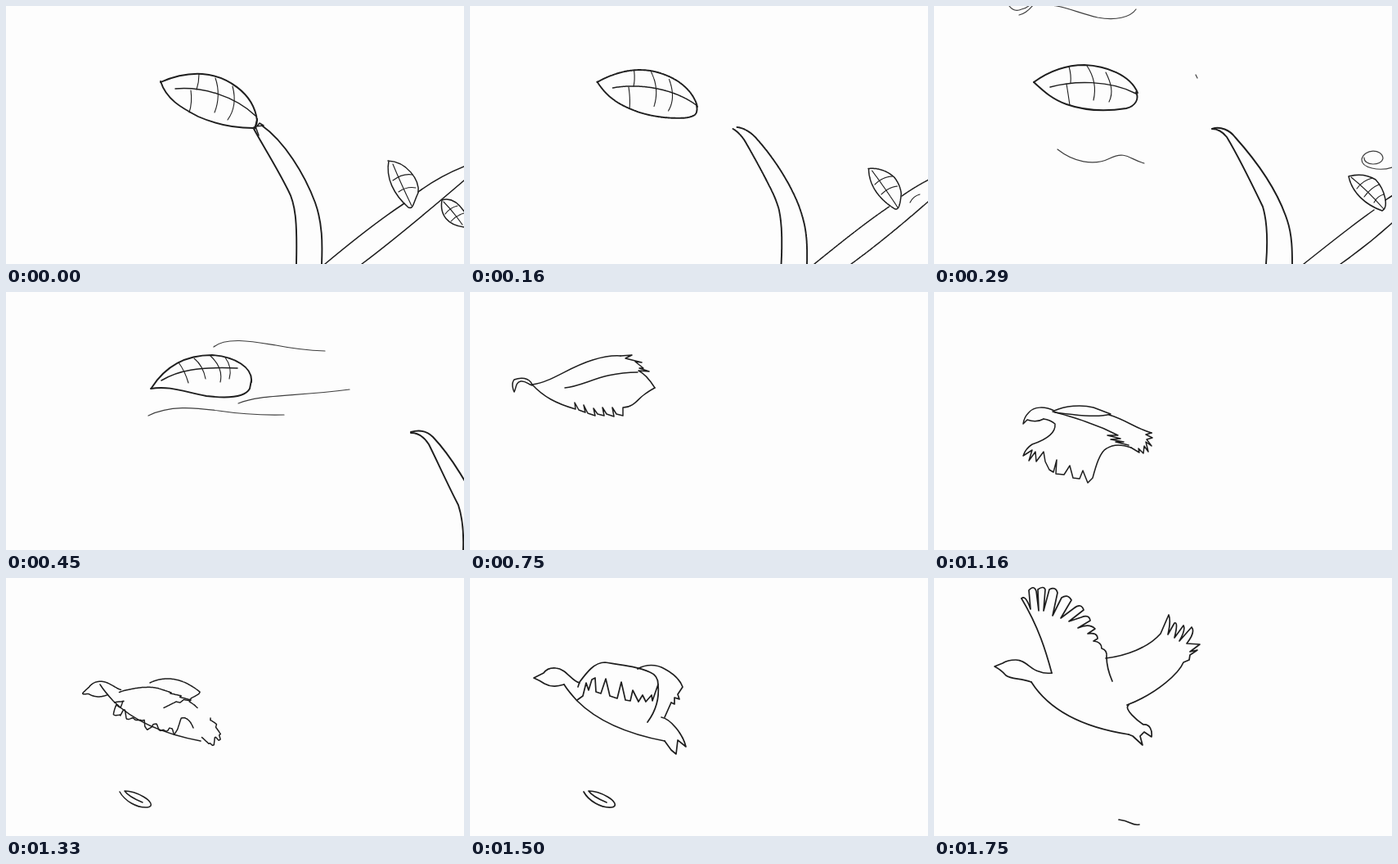
These frames come from a looping animation (560 by 315 pixels, 1.83 s). An HTML page:

```html
<!DOCTYPE html>
<html lang="en">
<head>
<meta charset="utf-8">
<title>Leaf to bird</title>
<style>
html, body { margin: 0; width: 100%; height: 100%; overflow: hidden; background: #fdfdfd; }
svg { display: block; width: 100vw; height: 100vh; }
path { fill: none; stroke: #1e1e1e; stroke-linecap: round; stroke-linejoin: round; }
</style>
</head>
<body>
<svg viewBox="0 0 560 315">
  <g id="branch"></g>
  <g id="flyer"></g>
  <g id="wind"></g>
</svg>
<script>
const LOOP = 1830, TICK = LOOP / 44, SAMPLES = 160;

const smooth = u => u * u * (3 - 2 * u);
const linear = u => u;

// Each pose holds until `hold`, then eases into the next, with an optional sideways bump.
const flyer = [
  { at: 0, hold: 1, ease: smooth, strokes: {
    top: 'M189 93C205 86 224 82 240 83C268 85 303 105 307 140',
    low: 'M189 92C196 114 214 124 235 135C258 145 280 149 302 149C306 148 307 144 307 138',
    rim: 'M207 101C240 98 280 110 305 134',
    rib1: 'M236 83Q236 93 233 102',
    rib2: 'M226 103Q228 118 224 130',
    rib3: 'M256 88C261 102 260 118 255 130',
    rib4: 'M277 98C281 113 279 128 271 139'
  } },
  { at: 7, ease: smooth, strokes: {
    top: 'M122 93C140 80 160 72 184 72C210 73 240 84 249 106',
    low: 'M122 93C135 105 145 114 162 120C185 128 210 129 235 125C247 122 251 113 247 105',
    rim: 'M142 99C170 91 215 90 247 107',
    rib1: 'M165 74Q168 84 167 94',
    rib2: 'M162 95Q164 107 166 121',
    rib3: 'M187 73C195 85 199 98 195 115',
    rib4: 'M210 81C216 93 220 105 214 117'
  } },
  { at: 11, ease: u => u ** 3, bump: 18, strokes: {
    top: 'M178 117C192 95 215 77 252 77C280 79 302 92 300 110',
    low: 'M177 118C200 114 218 122 245 127C270 130 292 129 298 118L300 108',
    rim: 'M190 108C210 96 235 91 283 93',
    rib1: 'M211 86Q219 97 223 111',
    rib2: 'M230 81Q241 90 244 106',
    rib3: 'M250 78Q266 93 262 110',
    rib4: 'M268 80Q277 92 273 106'
  } },
  { at: 18, ease: linear, bump: -50, strokes: {
    head: 'M76 113C72 104 62 104 54 107C50 112 53 120 54 122C57 117 55 111 62 109C68 108 70 112 76 114',
    top: 'M76 113C100 110 120 92 150 83Q170 77 184 78',
    low: 'M76 113C90 128 105 136 129 143L128 135L133 144L141 147L139 138L144 148L153 151L151 142L156 149L164 151L162 141L167 149L176 152L174 141L179 149L187 151L187 141C200 141 206 130 212 126Q220 120 226 117',
    rim: 'M116 117C140 115 160 98 205 98',
    tail: 'M184 78L198 77L190 81L210 86L202 85L212 93L207 93L219 97L206 96Q216 101 226 117'
  } },
  { at: 28, ease: linear, strokes: {
    head: 'M147 145C135 139 122 140 116 147Q110 153 109 161L114 156Q125 160 134 155',
    top: 'M147 145C160 139 180 137 195 141L216 149C200 154 170 150 148 147',
    back: 'M214 150C235 156 245 166 266 172',
    rim: 'M145 146C160 150 175 154 190 160Q208 166 225 175L212 175L228 179L216 180L232 183L222 183L238 187',
    low: 'M134 155Q142 156 148 161C149 172 138 180 120 186Q112 191 109 200L120 193L116 206L124 195L125 207L134 195L136 207L141 217L146 220L150 205L149 222L159 223L166 212L170 227L178 228L182 218L188 233L194 227C198 212 203 195 211 191C220 185 230 186 241 190',
    tail: 'M266 172L259 174L267 178L260 180L266 188L259 183L262 195L257 188L256 197L250 191L251 196L241 190'
  } },
  { at: 36, ease: u => [0, .22, .45, .68, .9, .9][Math.round(u * 6)] ?? 1, strokes: {
    head: 'M134 128C124 126 118 111 105 110Q95 109 90 116L78 122Q85 125 91 129C100 134 108 132 115 130',
    belly: 'M115 130Q120 138 131 150C152 171 185 189 238 199',
    rim: 'M132 133L134 127C143 115 152 103 165 103C185 106 205 108 220 115Q230 119 230 130',
    low: 'M131 149L138 144L142 128L145 137L149 124L153 122L154 139L160 141L166 123L171 144L180 147L185 127L190 149L196 150L199 137L206 151L211 143L215 151L222 143L223 150L230 130C232 150 226 164 217 176',
    top: 'M205 111C215 105 228 105 238 111Q255 120 260 133L254 142L256 148L250 146L250 154L246 152L238 170',
    tail: 'M234 170C245 172 260 190 264 206L254 198L252 215L246 210L238 199',
    wisp: 'M139 261C145 272 160 281 173 280C181 279 177 272 168 267Q156 260 145 260Q150 267 167 274'
  } },
  { at: 42, ease: linear, strokes: {
    head: 'M144 116Q135 117 128 114C118 112 112 100 100 100Q90 100 84 104L74 108Q82 112 88 119C95 124 105 122 119 127',
    belly: 'M119 127C140 160 180 182 238 191',
    rim: 'M144 116C137 90 128 60 107 25',
    low: 'M107 25Q112 20 118 38L116 15Q122 8 125 16L128 40L127 14Q134 9 136 14L134 40L141 14Q149 10 151 18L145 46L156 24Q164 19 168 27L155 49L171 37Q180 30 183 39L165 53L180 48Q190 44 191 52L176 61Q190 55 197 62L188 68Q200 66 200 74L195 77Q205 78 205 86Q212 88 211 96Q211 110 218 126',
    top: 'M210 98C235 95 262 85 277 68L287 45Q290 52 286 69L294 55Q299 53 294 73L305 58Q308 63 300 77L315 60Q320 66 309 80L325 81L313 90L322 88L313 94L312 100L305 103C300 115 275 140 236 155',
    tail: 'M238 155C231 160 250 175 256 179C264 178 267 186 266 194L257 188L252 193L255 204L243 193L238 191',
    wisp: 'M226 295Q234 296 240 299Q246 302 251 301'
  } }
];

const branch = [
  { at: 0, hold: 1, ease: smooth, strokes: {
    knot: 'M307 138L304 150L310 143L315 146L305 147L309 158',
    left: 'M303 150C315 172 330 195 345 225C355 243 356 270 355 315',
    right: 'M313 146C340 165 365 205 378 240C387 265 387 290 386 315',
    limb: 'M390 315C420 290 455 262 487 241',
    limbEnd: 'M504 227Q530 208 560 196',
    limbLow: 'M435 315C475 285 505 260 560 213',
    leaf: 'M468 189C464 210 474 230 492 246C498 248 497 243 504 228C506 212 490 190 467 189',
    vein1: 'M473 193Q482 215 496 244',
    vein2: 'M473 213Q485 204 497 206',
    vein3: 'M480 227Q490 220 501 222',
    bud: 'M561 270C540 268 530 255 533 237C545 233 555 243 561 252',
    vein4: 'M535 239Q546 250 558 267',
    vein5: 'M537 254Q543 246 552 244',
    vein6: 'M544 263Q550 256 560 253'
  } },
  { at: 7, ease: smooth, strokes: {
    left: 'M340 150Q350 150 358 160C370 180 390 220 402 245C408 265 408 290 406 315',
    right: 'M340 150C350 146 362 152 368 160C395 190 420 225 432 262C438 280 438 300 438 315',
    limb: 'M452 315C480 293 508 270 538 249',
    limbEnd: 'M552 237Q580 218 610 206',
    limbLow: 'M497 315Q530 292 560 265',
    leaf: 'M507 208C511 228 528 243 548 250C556 246 552 225 540 212C530 206 518 205 507 208',
    vein1: 'M510 209Q530 225 550 248',
    vein2: 'M517 223Q524 213 536 210',
    vein3: 'M526 233Q534 222 544 218',
    vein7: 'M538 240Q542 232 550 230'
  } },
  { at: 11, ease: linear, strokes: {
    left: 'M495 172C505 172 512 178 517 186C528 208 540 235 553 260C558 275 560 290 559 315',
    right: 'M495 171C505 168 515 170 522 177C542 198 570 240 584 280Q592 300 592 320',
    limb: 'M606 335L692 269',
    limbLow: 'M650 335L714 285',
    leaf: 'M661 228C665 248 682 263 702 270C710 266 706 245 694 232C684 226 672 225 661 228'
  } },
  { at: 16, ease: linear, strokes: {} }
];

const gusts = [
  { at: 7, from: 5, to: 9, paths: [
    'M92 0Q98 8 107 4Q113 3 118 -2M104 11Q113 9 121 -1C150 -5 170 7 200 14C222 18 240 14 247 4',
    'M151 175C170 190 195 196 215 186C235 176 240 188 257 192',
    'M320 84L322 88',
    'M560 197C545 202 522 198 523 187C526 174 548 174 549 186C547 196 525 195 526 185'
  ] },
  { at: 11, from: 10, to: 13, paths: [
    'M254 67C270 54 305 61 330 65Q360 71 390 72',
    'M284 136C310 125 350 128 420 119',
    'M174 151C200 138 230 141 260 145Q300 151 340 150'
  ] }
];

const SVG = 'http://www.w3.org/2000/svg';
const ruler = document.createElementNS(SVG, 'path');
const cache = {};

function sample(d) {
  if (!cache[d]) {
    ruler.setAttribute('d', d);
    const length = ruler.getTotalLength();
    cache[d] = Array.from({ length: SAMPLES + 1 }, (_, i) => ruler.getPointAtLength(length * i / SAMPLES));
  }
  return cache[d];
}

function morph(a, b, u) {
  if (u === 0) return a;
  if (u === 1) return b;
  const end = sample(b);
  return 'M' + sample(a).map((p, i) =>
    (p.x + (end[i].x - p.x) * u).toFixed(1) + ' ' + (p.y + (end[i].y - p.y) * u).toFixed(1)).join('L');
}

function widthOf(name, tick) {
  if (/rib|vein/.test(name)) return 1.1;
  if (tick < 14) return /top|low|left|right/.test(name) ? 1.9 : 1.5;
  return tick < 34 ? 1.5 : 1.7;
}

const line = (d, width, extra = '') => `<path d="${d}" stroke-width="${width}" ${extra}/>`;

function drawTrack(group, poses, tick, drift = 0) {
  const index = poses.findLastIndex(p => p.at <= tick);
  const a = poses[index], b = poses[index + 1] || a;
  const start = a.hold ?? a.at;
  const u = b === a ? 0 : Math.max(0, (tick - start) / (b.at - start));
  const e = a.ease(u);
  const shift = (a.bump || 0) * Math.sin(Math.PI * u) + drift;
  const names = new Set([...Object.keys(a.strokes), ...Object.keys(b.strokes)]);
  let out = '';
  for (const name of names) {
    const from = a.strokes[name], to = b.strokes[name];
    const d = from && to ? morph(from, to, e) : u < .5 ? from : to;
    if (d) out += line(d, widthOf(name, tick));
  }
  group.setAttribute('transform', `translate(${shift} 0)`);
  group.innerHTML = out;
}

function drawWind(group, tick) {
  group.innerHTML = gusts.filter(g => tick >= g.from && tick <= g.to).map(g => {
    const away = tick - g.at;
    return g.paths.map(d => line(d, 1.2, `opacity=".85" transform="translate(${away * 27} 0)"`)).join('');
  }).join('');
}

const layer = id => document.getElementById(id);
let shown = -1;

function render(now) {
  const tick = Math.floor((now % LOOP + 8) / TICK) % 44;
  const held = tick === 43 ? 42 : tick;
  if (held !== shown) {
    shown = held;
    drawTrack(layer('branch'), branch, held, Math.max(0, held - 11) * 32);
    drawTrack(layer('flyer'), flyer, held);
    drawWind(layer('wind'), held);
  }
  requestAnimationFrame(() => render(performance.now() - origin));
}

const origin = performance.now();
render(0);
</script>
</body>
</html>
```
